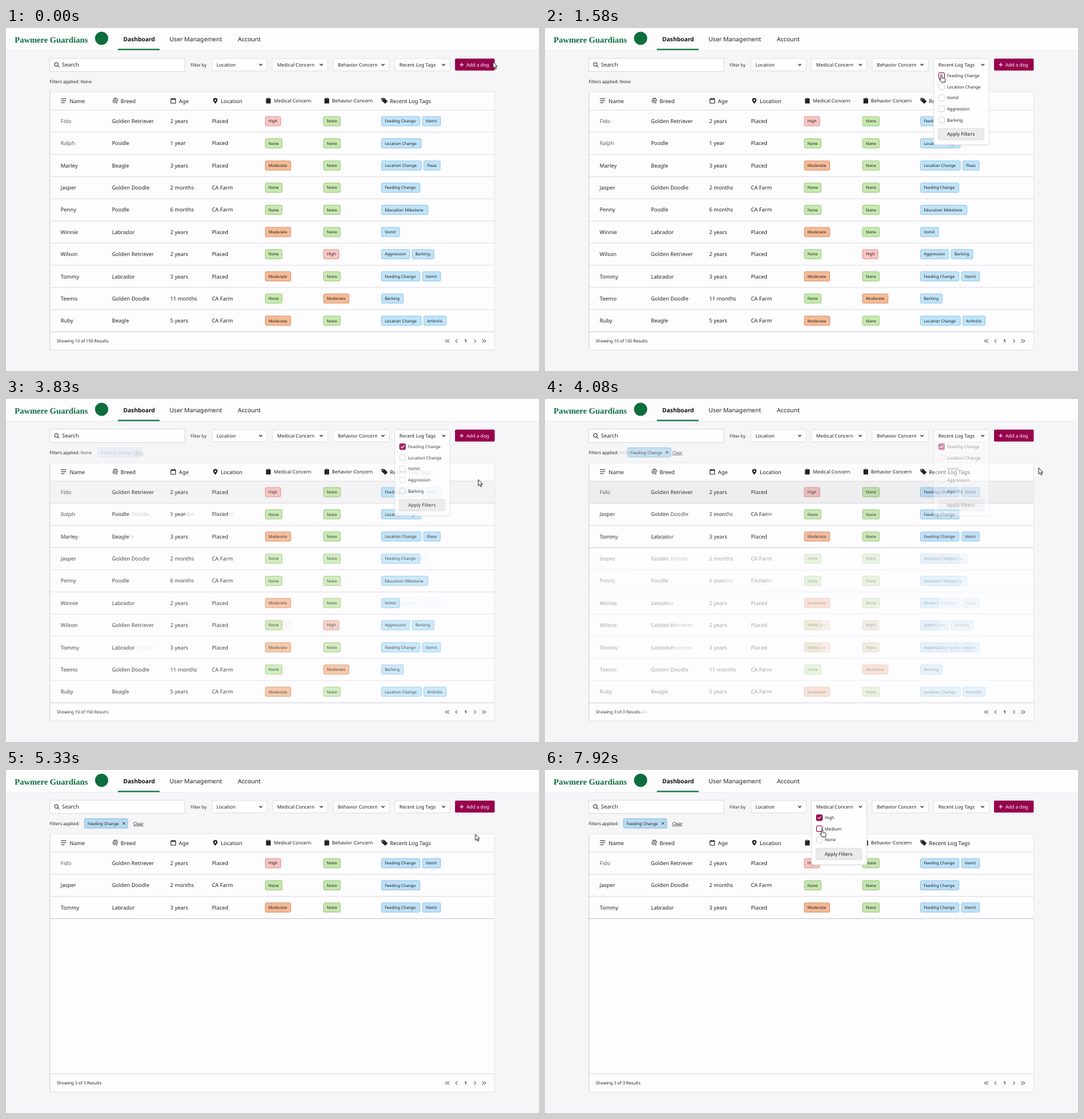
These frames come from a looping animation (800 by 516 pixels, 8 s). An HTML page:

```html
<!DOCTYPE html>
<html lang="en">
<head>
<meta charset="utf-8">
<title>Dog dashboard</title>
<style>
  html, body { margin: 0; width: 100%; height: 100%; overflow: hidden; background: #f6f5f7; }
  svg { display: block; font-family: "Noto Sans", "Open Sans", sans-serif; text-rendering: geometricPrecision; }
  .anim { animation: 8s ease-out infinite; }
  .step { animation: 8s step-end infinite; }

  .before  { animation-name: before; }
  .after   { animation-name: after; mix-blend-mode: multiply; }
  .sorted  { animation-name: sorted; }
  .chip    { animation-name: chip; }
  .rowHover { animation-name: rowHover; }
  .menuTags { animation-name: menuTags; }
  .menuMed  { animation-name: menuMed; }
  .hoverTags { animation-name: hoverTags; }
  .checkTags { animation-name: checkTags; }
  .hoverApply { animation-name: hoverApply; }
  .hoverHigh { animation-name: hoverHigh; }
  .checkHigh { animation-name: checkHigh; }
  .hoverMedium { animation-name: hoverMedium; }
  .arrow { animation-name: arrow; }
  .hand  { animation-name: hand; }
  .cursor { animation: cursor 8s ease-in-out infinite; }

  @keyframes before { 0%, 46.9% { opacity: 1 } 54.1%, 100% { opacity: 0 } }
  @keyframes after  { 0%, 46.9% { opacity: 0 } 54.1%, 100% { opacity: 1 } }
  @keyframes sorted { 0%, 46.9% { opacity: 0 } 51% { opacity: .18 } 54.1%, 100% { opacity: 0 } }
  @keyframes chip { 0%, 46.9% { transform: translateX(26px) } 54.1%, 100% { transform: none } }
  @keyframes rowHover { 0%, 47% { opacity: 0 } 49%, 52% { opacity: 1 } 54.1%, 100% { opacity: 0 } }
  @keyframes menuTags {
    0%, 12.4% { opacity: 0 }
    15.5% { opacity: 1 }
    46.9% { opacity: 1; animation-timing-function: linear }
    54.1%, 100% { opacity: 0 }
  }
  @keyframes menuMed { 0%, 82.4% { opacity: 0 } 85.5%, 100% { opacity: 1 } }

  @keyframes hoverTags { 0% { opacity: 0 } 18%, 100% { opacity: 1 } }
  @keyframes checkTags { 0% { opacity: 0 } 22.5%, 100% { opacity: 1 } }
  @keyframes hoverApply { 0% { opacity: 0 } 32.2% { opacity: 1 } 46%, 100% { opacity: 0 } }
  @keyframes hoverHigh { 0% { opacity: 0 } 90%, 100% { opacity: 1 } }
  @keyframes checkHigh { 0% { opacity: 0 } 93%, 100% { opacity: 1 } }
  @keyframes hoverMedium { 0% { opacity: 0 } 97.2%, 100% { opacity: 1 } }
  @keyframes arrow { 0% { opacity: 1 } 17.5% { opacity: 0 } 45.5% { opacity: 1 } 89%, 100% { opacity: 0 } }
  @keyframes hand  { 0% { opacity: 0 } 17.5% { opacity: 1 } 45.5% { opacity: 0 } 89%, 100% { opacity: 1 } }

  @keyframes cursor {
    0%, 1% { transform: translate(731px, 51px) }
    10%, 13.5% { transform: translate(657px, 56px) }
    18.8%, 24% { transform: translate(595px, 70px); animation-timing-function: ease-in }
    31.5% { transform: translate(635px, 149px); animation-timing-function: ease-out }
    35%, 43.7% { transform: translate(636.5px, 161px) }
    50.5%, 56.2% { transform: translate(741px, 103.5px) }
    66%, 66.6% { transform: translate(704.5px, 96.5px) }
    76%, 84.2% { transform: translate(470.5px, 56px) }
    90.5%, 94% { transform: translate(411.5px, 71px) }
    98%, 100% { transform: translate(416px, 89px) }
  }
</style>
</head>
<body>
<svg id="stage" width="800" height="516" viewBox="0 0 800 516"></svg>
<script>
const INK = '#222', WINE = '#96004c', GREEN = '#0c6e3d';
const TOP = 123.5, PITCH = 33.35;

const dogs = [
  'Fido|Golden Retriever|2 years|Placed|High|None|Feeding Change|Vomit',
  'Ralph|Poodle|1 year|Placed|None|None|Location Change',
  'Marley|Beagle|3 years|Placed|Moderate|None|Location Change|Fleas',
  'Jasper|Golden Doodle|2 months|CA Farm|None|None|Feeding Change',
  'Penny|Poodle|6 months|CA Farm|None|None|Education Milestone',
  'Winnie|Labrador|2 years|Placed|Moderate|None|Vomit',
  'Wilson|Golden Retriever|2 years|Placed|None|High|Aggression|Barking',
  'Tommy|Labrador|3 years|Placed|Moderate|None|Feeding Change|Vomit',
  'Teemo|Golden Doodle|11 months|CA Farm|None|Moderate|Barking',
  'Ruby|Beagle|5 years|CA Farm|Moderate|None|Location Change|Arthritis'
].map(s => s.split('|'));

const levels = {
  None: ['#c7e9b0', '#98c878'],
  High: ['#f8c6c2', '#de938d'],
  Moderate: ['#f6bb97', '#d58f63']
};
const tagWidth = {
  None: 25, High: 23, Moderate: 38, 'Feeding Change': 57.5, 'Location Change': 59.5, Vomit: 27,
  Fleas: 24.5, 'Education Milestone': 69.5, Aggression: 42, Barking: 32.5, Arthritis: 33.5
};

const text = (x, y, s, size = 8, weight = 400, fill = INK, more = '') =>
  `<text x="${x}" y="${y}" font-size="${size}" font-weight="${weight}" fill="${fill}" ${more}>${s}</text>`;
const rect = (x, y, w, h, fill, stroke = 'none', more = '') =>
  `<rect x="${x}" y="${y}" width="${w}" height="${h}" rx="1.5" fill="${fill}" stroke="${stroke}" ${more}/>`;
const line = (d, color = INK, width = 1) =>
  `<path d="${d}" fill="none" stroke="${color}" stroke-width="${width}" stroke-linecap="round" stroke-linejoin="round"/>`;
const shape = d => `<path d="${d}" fill="${INK}" fill-rule="evenodd"/>`;
const group = (cls, body) => `<g class="${cls}">${body}</g>`;
const rule = (y, color = '#e0dfe3') => `<path d="M66 ${y}H733" stroke="${color}"/>`;

function tag(x, y, name, [fill, stroke] = ['#bfe4f9', '#8fc6e5']) {
  return rect(x, y - 7, tagWidth[name], 14, fill, stroke, 'stroke-width=".9"') +
    text(x + 4.7, y + 2.2, name, 6.1, 500);
}

function row(dog, i) {
  const y = TOP + PITCH * (i + .5), [name, breed, age, place, med, beh, ...tags] = dog;
  const shade = name === 'Fido' || name === 'Ralph' ? '#5c5c5e' : INK;
  let x = 563.7;
  return text(82, y + 2.9, name, 8, 400, shade) +
    [[159, breed], [246.5, age], [309, place]].map(([cx, s]) => text(cx, y + 2.9, s)).join('') +
    tag(389.3, y, med, levels[med]) + tag(476.8, y, beh, levels[beh]) +
    tags.map(t => { const s = tag(x, y, t); x += tagWidth[t] + 4; return s; }).join('') +
    rule(TOP + PITCH * (i + 1));
}

const chevron = x => line(`M${x - 2} 54.4l2 2 2-2`, INK, 1.1);
const select = (x, w, label) =>
  rect(x, 46, w, 18.5, '#fefdff', '#e2e1e5') + text(x + 7, 58, label, 7.15, 500) + chevron(x + w - 9.7);

function checkbox(x, y, hover, check) {
  let s = rect(x, y, 8.5, 8.5, '#fff', '#d4d3d7', 'stroke-width=".9"');
  if (hover) s += group('step ' + hover, rect(x, y, 8.5, 8.5, '#fff', WINE));
  if (check) s += group('step ' + check,
    rect(x, y, 8.5, 8.5, WINE, WINE) + line(`M${x + 2.2} ${y + 4.4}l1.6 1.6 2.8-3.2`, '#fff', 1.1));
  return s;
}

// options: [label, hover class, check class]
function menu(cls, x, label, options, applyHover) {
  const end = 67 + options.length * 16.65, bx = x + 6.8;
  const apply = (fill, edge) => rect(bx, end + .9, 68.5, 17, fill, edge);
  return group('anim ' + cls,
    rect(x - .5, 47, 84, end - 20.5, '#000', 'none', 'opacity=".07"') +
    rect(x, 46, 83, end - 20.5, '#fefdff', '#e2e1e5') +
    text(x + 7, 58, label, 7.15, 500) + chevron(x + 73.5) +
    options.map(([name, hover, check], i) => {
      const y = 71.6 + i * 16.65;
      return checkbox(x + 7.5, y - 4.2, hover, check) + text(x + 20, y + 2.3, name, 6.4);
    }).join('') +
    apply('#ebeaec', '#dddcdf') +
    (applyHover ? group('step ' + applyHover, apply('#d5d4d6', '#c3c2c5')) : '') +
    text(x + 20, end + 12, 'Apply Filters', 7.2, 500));
}

const clipboard = x =>
  shape(`M${x} 106h2v-1h3v1h2v7.5h-7zM${x + 2.5} 106.6h2v-.8h-2z`);

const header =
  '<rect width="800" height="33" fill="#fefdfe"/><path d="M0 33.5H800" stroke="#f0eff2"/>' +
  text(13, 22, 'Pawmere Guardians', 12.5, 700, GREEN, 'font-family="Liberation Serif, serif"') +
  `<circle cx="143.5" cy="15.5" r="10" fill="${GREEN}"/>` +
  text(176, 20.3, 'Dashboard', 8.8, 700, '#111') +
  text(245.5, 20.3, 'User Management', 9, 500) +
  text(348, 20.3, 'Account', 9, 500) +
  '<rect x="168" y="31.3" width="62.5" height="2" fill="#0a753c"/>';

const toolbar =
  rect(65.5, 45.5, 203, 20, '#fefdff', '#dddce0') +
  `<circle cx="75.6" cy="54.8" r="2.8" fill="none" stroke="${INK}"/>` + line('M77.8 57l2.2 2.2') +
  text(84, 58.4, 'Search') + text(277, 57.8, 'Filter by', 6.4) +
  select(309, 83, 'Location') + select(400, 83, 'Medical Concern') +
  select(491, 84.5, 'Behavior Concern') + select(583.5, 83, 'Recent Log Tags') +
  rect(674, 46, 59.5, 18, WINE) + line('M681.5 55.2h5M684 52.7v5', '#fff') +
  text(691, 58, 'Add a dog', 7.15, 500, '#fff') +
  text(65.5, 82.8, 'Filters applied:', 6.5);

const table =
  rect(66, 97, 667.5, 388.2, '#000', 'none', 'opacity=".07"') +
  rect(66, 96, 667.5, 388.3, '#fdfcfe', '#e8e7ea') +
  '<path d="M66 97V484" stroke="#d8d7db"/>';

const columns =
  line('M83 106.3h7M83 109.3h7M83 112.3h4.5', INK, .9) +
  line('M160.8 111.5c-1.4-7 7-8 7-1.8M162.5 113c-1.6-6 3.4-6.8 3.6-2.6 0 1.5.2 2 .7 2.6M164.3 109.5q0 2.5 1 3.8M161.5 106.5q2.7-2.7 5.4 0', INK, .8) +
  line('M248 106.5h6.6v6.7h-6.6zM248 107.6h6.6M249.7 105.3v1.2M252.9 105.3v1.2', INK, .9) +
  shape('M314.2 114c-5-5.2-3.8-8.7 0-8.7s5 3.5 0 8.7zM313 108.7a1.2 1.2 0 1 0 2.4 0a1.2 1.2 0 1 0-2.4 0z') +
  clipboard(390.3) + clipboard(478) +
  shape('M563.5 105.3h4.2l5.2 5-3.7 3.8-5.7-5.3zM564.8 107a.8.8 0 1 0 1.6 0a.8.8 0 1 0-1.6 0z') +
  [[95.5, 'Name'], [172, 'Breed'], [259.5, 'Age'], [322.3, 'Location'], [576.3, 'Recent Log Tags']]
    .map(([x, s]) => text(x, 112.6, s, 8.1, 500)).join('') +
  text(402, 112.3, 'Medical Concern', 7.2) + text(489.3, 112.3, 'Behavior Concern', 7.3) +
  rule(TOP);

const footer = rule(457, '#dad9dd') +
  line('M661.8 468.6l-2.2 2.3 2.2 2.3M664.8 468.6l-2.2 2.3 2.2 2.3M677 468.6l-2.2 2.3 2.2 2.3', INK, .9) +
  text(688, 473.4, '1', 6.4, 600) +
  line('M703 468.6l2.2 2.3-2.2 2.3M715 468.6l2.2 2.3-2.2 2.3M718 468.6l2.2 2.3-2.2 2.3', INK, .9);

const before = group('anim before',
  dogs.map(row).join('') + text(112, 82.8, 'None', 6.5) +
  text(76.3, 473.4, 'Showing 10 of 150 Results', 6.35, 500));

const order = [0, 3, 7, 4, 1, 2, 5, 6, 8, 9].map(i => dogs[i]);
const after = group('anim after',
  order.slice(0, 3).map(row).join('') + rule(TOP + PITCH * 3, '#cfced3') +
  group('anim chip',
    rect(117.8, 73.3, 65, 14, '#bfe4f9', '#8fc6e5') + text(122.3, 82.6, 'Feeding Change', 6.2) +
    line('M175.3 78.6l3.4 3.4M178.7 78.6l-3.4 3.4', INK, .9)) +
  text(191, 82.8, 'Clear', 6.4, 400, INK, 'text-decoration="underline"') +
  text(76.3, 473.4, 'Showing 3 of 3 Results', 6.35, 500));
const sorted = group('anim sorted', order.slice(3).map((d, i) => row(d, i + 3)).join(''));

const hoverRow = group('anim rowHover', '<rect x="66.5" y="124" width="666.5" height="33" fill="#eeedef"/>');

const menus =
  menu('menuTags', 583.5, 'Recent Log Tags', [
    ['Feeding Change', 'hoverTags', 'checkTags'], ['Location Change'], ['Vomit'], ['Aggression'], ['Barking']
  ], 'hoverApply') +
  menu('menuMed', 400, 'Medical Concern', [
    ['High', 'hoverHigh', 'checkHigh'], ['Medium', 'hoverMedium'], ['None']
  ]);

const pointer = (cls, d) =>
  `<path class="step ${cls}" d="${d}" fill="#fff" stroke="#1c1c1c" stroke-width=".9" stroke-linejoin="round"/>`;
const cursor = group('cursor',
  pointer('arrow', 'M0 0v9.3l2.1-1.9 1.5 3.4 1.5-.7-1.5-3.2h2.9z') +
  pointer('hand', 'M-1 1.2c0-1.6 2-1.6 2 0v3.6l3.7.9c1 .3 1.4.9 1.2 2l-.7 4h-4.9l-3.2-3.8c-.6-.9.4-1.7 1.2-1l.7.6z'));

document.getElementById('stage').innerHTML =
  header + toolbar + table + hoverRow + columns + footer + before + sorted + after + menus + cursor;
</script>
</body>
</html>
```
